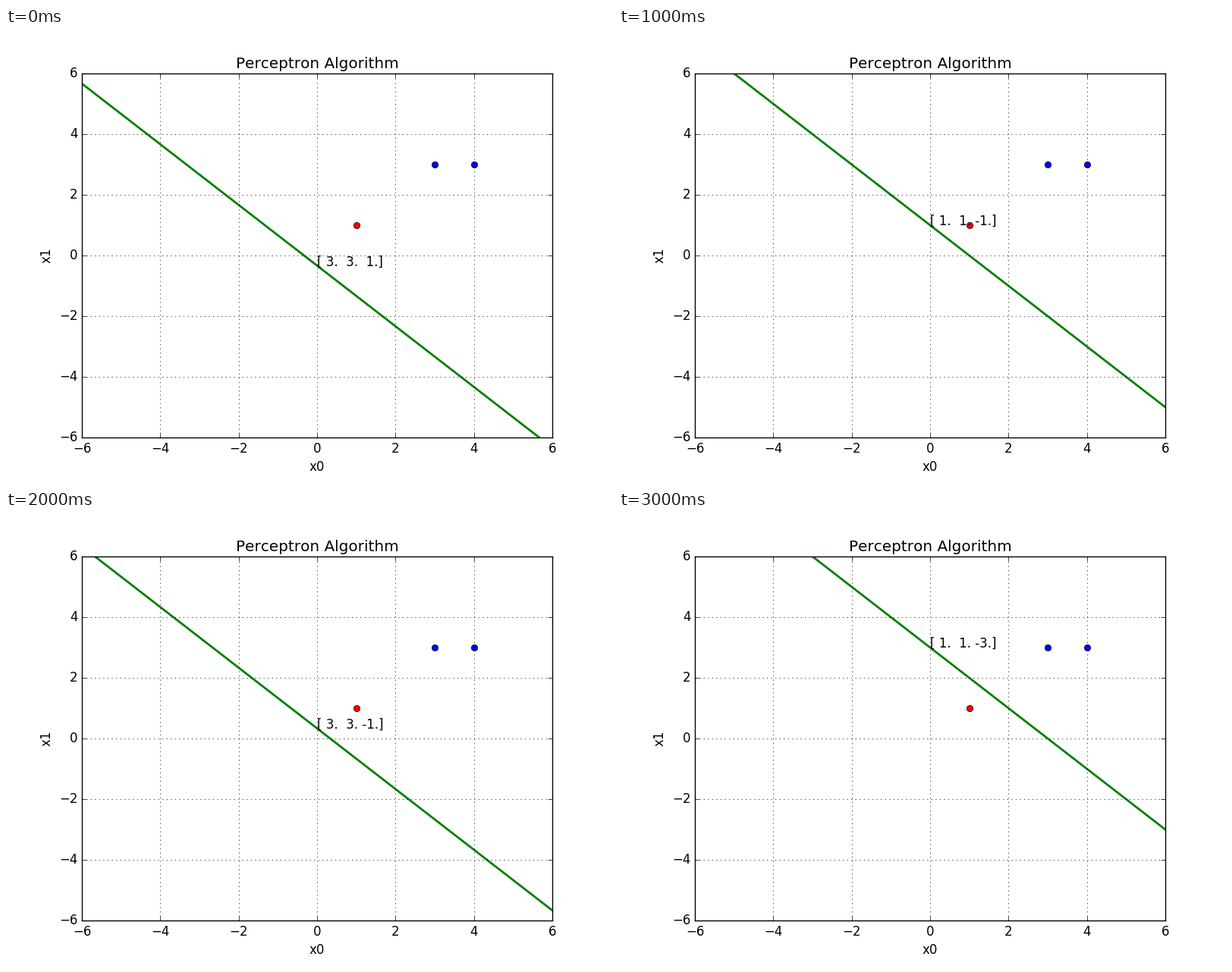
A matplotlib script for the animation above (3.5 s loop, 800 by 600 pixels).

```python
import matplotlib.pyplot as plt
import numpy as np
from matplotlib.animation import FuncAnimation

plt.style.use("classic")
# Kerning effectively off: glyphs advance by their plain widths.
plt.rcParams.update({"font.family": "DejaVu Sans", "text.kerning_factor": 6})

POSITIVE = [(3, 3), (4, 3)]
NEGATIVE = [(1, 1)]
LIMIT = 6
STEP_MS = 500


def train():
    """Return the weights (w0, w1, bias) after each perceptron correction."""
    samples = [np.array([*p, 1]) for p in POSITIVE]
    samples += [-np.array([*p, 1]) for p in NEGATIVE]
    weights = np.zeros(3, dtype=int)
    history = []
    while True:
        wrong = next((s for s in samples if weights @ s <= 0), None)
        if wrong is None:
            return history
        weights = weights + wrong
        # Without a slope there is no boundary to draw, so the last one stays.
        history.append(weights if weights[1] else history[-1])


def format_weights(weights):
    return "[" + " ".join(f"{w:2d}." for w in weights) + "]"


history = train()

fig = plt.figure(figsize=(8, 6), dpi=100, facecolor="white")
ax = fig.add_subplot(111)
ax.set(
    xlim=(-LIMIT, LIMIT),
    ylim=(-LIMIT, LIMIT),
    xlabel="x0",
    ylabel="x1",
    title="Perceptron Algorithm",
)
ax.grid(True)

ax.plot(*zip(*POSITIVE), "bo")
ax.plot(*zip(*NEGATIVE), "ro")

xs = np.array([-LIMIT - 1, LIMIT + 1])
boundary, = ax.plot(xs, -xs, "g", linewidth=2, scalex=False, scaley=False)
label = ax.text(0, 0, "")


def update(step):
    w0, w1, bias = history[step]
    boundary.set_ydata(-(w0 * xs + bias) / w1)
    label.set_position((0, -bias / w1))
    label.set_text(format_weights(history[step]))
    return boundary, label


animation = FuncAnimation(
    fig, update, frames=len(history), interval=STEP_MS, repeat=True, repeat_delay=0
)

plt.show()
```
